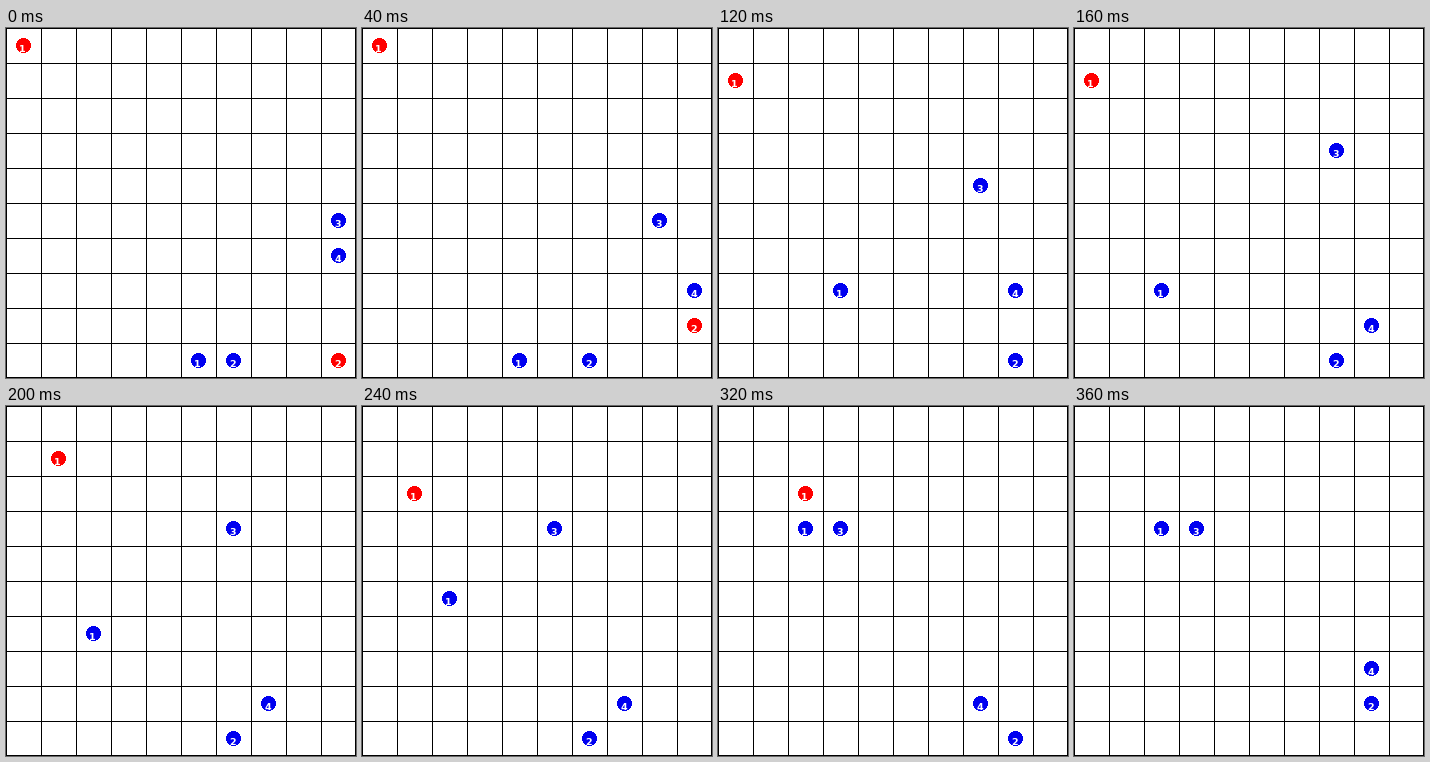
Recreate the animation shown at these times as a matplotlib script. Size 350 px wide and 350 px high, loop 400 ms.

```python
import matplotlib.pyplot as plt
from matplotlib.animation import FuncAnimation
from matplotlib.patches import Circle, Rectangle

SIZE, CELL, FRAMES, STEP_MS = 350, 35, 10, 40
DPI = 100
RED, BLUE = "#ff0000", "#0000f0"
PX = 72 / DPI  # one pixel in points

# Each route lists a column-row pair per step; ".." means off the board.
ROUTES = [
    ("1", RED, "00 00 00 01 01 11 12 22 22 .."),
    ("2", RED, "99 98 97 .. .. .. .. .. .. .."),
    ("1", BLUE, "59 49 39 37 27 26 25 24 23 23"),
    ("2", BLUE, "69 69 79 89 79 69 69 79 89 88"),
    ("3", BLUE, "95 85 85 74 73 63 53 43 33 33"),
    ("4", BLUE, "96 97 98 87 88 78 78 79 78 87"),
]

fig = plt.figure(figsize=(SIZE / DPI, SIZE / DPI), dpi=DPI, facecolor="white")
ax = fig.add_axes([0, 0, 1, 1])
ax.set_xlim(0, SIZE)
ax.set_ylim(SIZE, 0)
ax.axis("off")


def fill(x, y, w, h):
    ax.add_patch(Rectangle((x, y), w, h, fc="black", lw=0, snap=False, zorder=1))


for k in range(11):
    pos = min(k * CELL, SIZE - 1)
    fill(pos, 0, 1, SIZE)
    fill(0, pos, SIZE, 1)


class Piece:
    def __init__(self, label, color, route, zorder):
        self.route = route.split()
        # Without antialiasing every touched pixel fills, giving a 15 px disc.
        self.disc = ax.add_patch(
            Circle((0, 0), 6.9, fc=color, lw=0, antialiased=False, zorder=zorder))
        self.text = ax.text(0, 0, label, color="white", family="DejaVu Sans",
                            weight="bold", size=9.5 * PX, ha="center",
                            va="baseline", zorder=zorder + 0.5)

    def place(self, step):
        cell = self.route[step]
        shown = cell != ".."
        self.disc.set_visible(shown)
        self.text.set_visible(shown)
        if shown:
            x, y = (int(c) * CELL for c in cell)
            self.disc.center = (x + 17.5, y + 17.5)
            self.text.set_position((x + 16.7, y + 24))


pieces = [Piece(*spec, zorder=2 + i) for i, spec in enumerate(ROUTES)]


def update(frame):
    for piece in pieces:
        piece.place(frame % FRAMES)
    return [a for p in pieces for a in (p.disc, p.text)]


def reset():
    return update(0)


anim = FuncAnimation(fig, update, frames=FRAMES, init_func=reset,
                     interval=STEP_MS, repeat=True, repeat_delay=0, blit=False)
plt.show()
```
